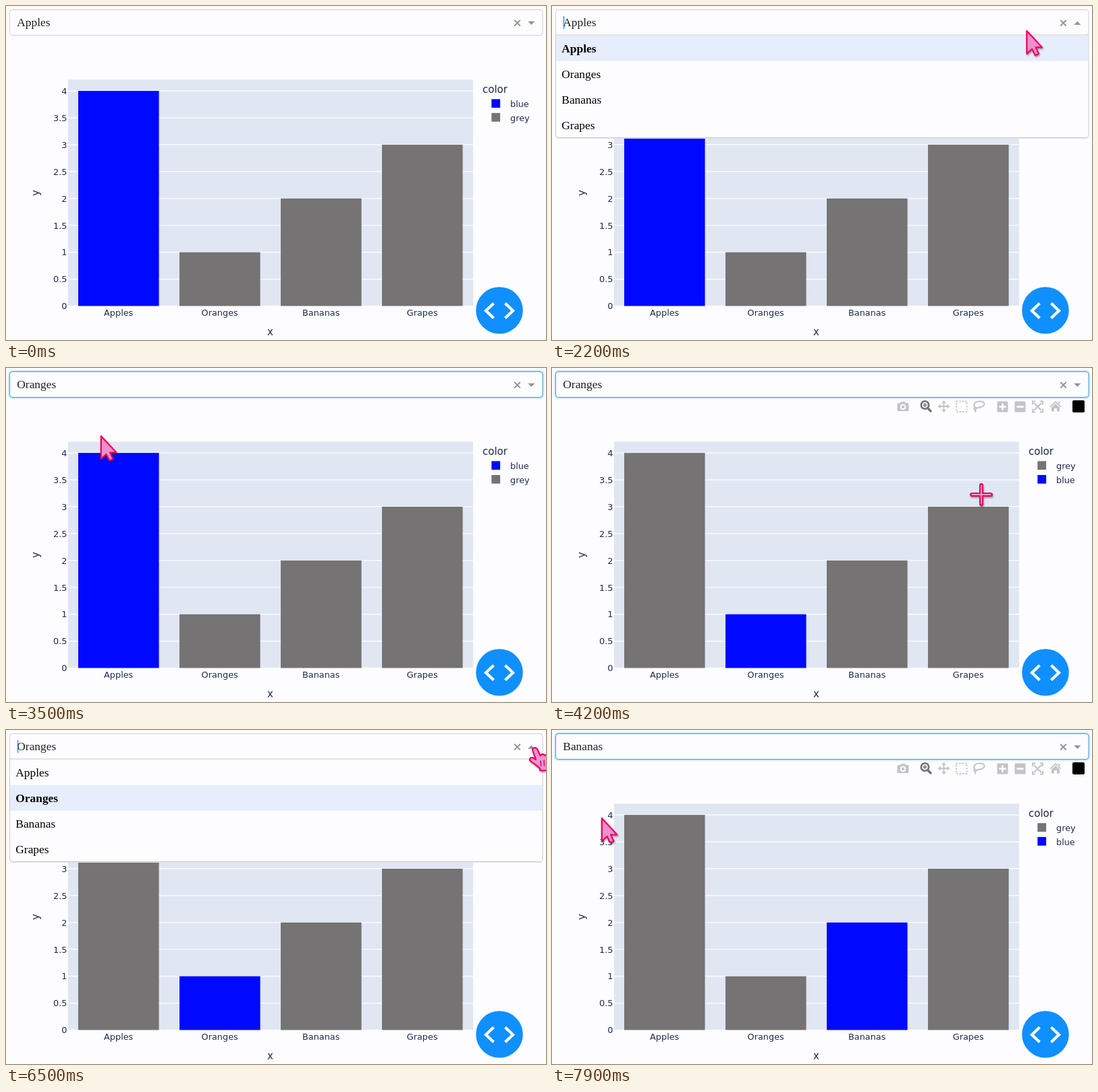
An HTML page that plays this animation: 800 by 496 pixels, repeating every 8 s.

```html
<!DOCTYPE html>
<html lang="en">
<head>
<meta charset="utf-8">
<title>Fruit bar chart</title>
<style>
  html, body { margin: 0; width: 100%; height: 100%; overflow: hidden; background: #fdfcff; }
  svg { display: block; width: 800px; height: 496px; }
  .plot { font: 12.85px "DejaVu Sans", sans-serif; fill: #1e2d4d; }
  .title { font-size: 15px; }
  .mid { text-anchor: middle; }
  .end { text-anchor: end; }
  .field { font: 17.4px "Liberation Serif", serif; fill: #222; }
  .tip { font: 14px "Liberation Sans", sans-serif; fill: #fff; }
  .icon { fill: #c3c3c8; stroke: none; }
  .line { fill: none; stroke: #c3c3c8; stroke-width: 2; }
  #pointer { filter: drop-shadow(1px 2px 1.2px rgba(0, 0, 0, .35)); }
  #pointer path { stroke-linejoin: round; stroke-linecap: round; }
</style>
</head>
<body>
<svg viewBox="0 0 800 496">
  <rect width="800" height="496" fill="#fdfcff"/>
  <g id="chart" class="plot"></g>

  <g id="tools">
    <path class="icon" fill-rule="evenodd" d="M513 52h3l1.500-2h5l1.500 2h3q1.500 0 1.500 1.500v9q0 1.500-1.500 1.500h-14q-1.500 0-1.500-1.500v-9q0-1.500 1.500-1.500zM520 53.500a4.300 4.300 0 1 0 .01 0zM520 55.500a2.300 2.300 0 1 1-.01 0z"/>
    <g fill="none" stroke="#717176">
      <circle cx="552.500" cy="55" r="5.700" stroke-width="2.600"/>
      <path d="M557 60l5 5" stroke-width="3.400"/>
      <path d="M549.500 55h6M552.500 52v6" stroke-width="1.700"/>
    </g>
    <path class="line" d="M573 57h15M580.500 50v15"/>
    <path class="icon" d="M571.500 57l4-3.500v7zM589.500 57l-4-3.500v7zM580.500 48l-3.500 4h7zM580.500 66l-3.500-4h7z"/>
    <rect class="line" x="599" y="49.500" width="15.500" height="15.500" stroke-dasharray="2.200 2.200"/>
    <path class="line" d="M628 59c-5-3-3-9 5-9.500 9-.5 9.500 6.500 3 8.500-3 1-6 1.500-8 1zm0 0c-2-1-4 1-2 2.500 2 1 3-1 2-2.500zM627 61.500q1 2-.5 4"/>
    <path class="icon" fill-rule="evenodd" d="M661 49.500h13q1.500 0 1.500 1.500v13q0 1.500-1.500 1.500h-13q-1.500 0-1.500-1.500v-13q0-1.500 1.500-1.500zM666 52.500v3.500h-3.500v3h3.500v3.500h3v-3.500h3.500v-3h-3.500v-3.500z"/>
    <path class="icon" fill-rule="evenodd" d="M687 49.500h13q1.500 0 1.500 1.500v13q0 1.500-1.500 1.500h-13q-1.500 0-1.500-1.500v-13q0-1.500 1.500-1.500zM688.500 56v3h10v-3z"/>
    <path class="line" d="M712 54v-4.500h4M723 49.500h4v4.500M727 61v4.500h-4M716 65.500h-4v-4.500M714 52l11 11M725 52l-11 11" stroke-width="1.700"/>
    <path class="icon" d="M746 49l8.500 8-1.200 1.200-7.300-6.700-7.300 6.700-1.200-1.200zM746 53l6 5.500v6h-4v-4.500h-4v4.500h-4v-6zM750 50h2.500v4l-2.500-2.300z"/>
    <rect x="771" y="48" width="18" height="18" rx="2" fill="#000"/>
  </g>

  <g id="label">
    <path id="labelBox" stroke="#fff"/>
    <text class="tip"></text><text class="tip"></text><text class="tip"></text>
  </g>

  <circle cx="731" cy="452" r="34.800" fill="#108fff"/>
  <path d="M722.500 441.500l-11.500 11 11.500 11M739.500 441.500l11.500 11-11.500 11" fill="none" stroke="#fff" stroke-width="4.200"/>

  <rect id="glow" x="4.500" y="4.500" width="791.500" height="40" rx="5" fill="none" stroke="#bfe0f2" stroke-width="3" opacity=".7"/>
  <rect id="box" x="5.500" y="5.500" width="789.500" height="38" rx="4" fill="#fdfcff"/>
  <g id="menu">
    <path d="M6 196.500h789" stroke="#e4e3e8"/>
    <path d="M5.500 43V191q0 4.500 4.500 4.500H790.500q4.500 0 4.500-4.500V43z" fill="#fdfcff" stroke="#cbcace"/>
    <rect id="focus" x="6" width="788.500" height="38.200" fill="#e6eefd"/>
    <path d="M6 43.500h789" stroke="#e2e2e8"/>
  </g>
  <text id="value" class="field" x="16.300" y="29.700"></text>
  <path id="caret" d="M17.500 15v19" stroke="#1698c0" stroke-width="1.300"/>
  <path d="M753.300 21l8.500 8.500M761.800 21l-8.500 8.500" stroke="#949397" stroke-width="1.900"/>
  <path id="arrow" fill="#949397"/>

  <g id="pointer">
    <g id="arrowCursor">
      <path d="M0.800 1V35L8.500 28 13.500 37.500 18.500 35 14 25.500H23.500z" fill="#ee8fd0" stroke="#ee0058" stroke-width="2.200"/>
    </g>
    <g id="handCursor">
      <path d="M-2.500 4.500C-4.500 0 2 -2 4 2L8.500 11.500C11 8.500 14 9 15 11.500 17 9.500 20 10 20.500 12.500 23 12 24.500 13.500 24.500 17V25.500Q24 28 22 30V33.500H8V30.500C3 26 0 23.500-5 20.500-9 18-6.500 13-2 15L2 17.500z" fill="#f294d8" stroke="#ee0058" stroke-width="2.200"/>
      <path d="M9 19.500l.8 7.500M14 18.500l.4 8M18.500 18.500v7.500" fill="none" stroke="#ee0058" stroke-width="1.600"/>
    </g>
    <g id="crossCursor" fill="none">
      <path d="M0-14V14M-14 0H14" stroke="#e6005e" stroke-width="6"/>
      <path d="M0-13.500V13.500M-13.500 0H13.500" stroke="#f2a5c6" stroke-width="2"/>
    </g>
  </g>
</svg>
<script>
const LOOP = 8000, STEP = 100, ROW = 38.2, MENU_TOP = 43.5;
const FRUIT = ['Apples', 'Oranges', 'Bananas', 'Grapes'];
const COUNT = [4, 1, 2, 3];
const COLOR = { blue: '#0008ff', grey: '#757374' };
const OPEN = [[2000, 3500], [6400, 7500]];
const PICKS = [3500, 7500];

// time, x, y of the pointer's hot spot
const PATH = [
  [1300, 797.5, 53], [1500, 788, 36], [1800, 779, 26], [2000, 779, 26],
  [2500, 480, 62], [2900, 238, 81.4], [3300, 140, 100], [3500, 140, 100],
  [3800, 330, 150], [4200, 636, 188], [4400, 570, 235], [4800, 320, 400],
  [5100, 350, 428], [5200, 386, 433], [5700, 650, 240], [6200, 780, 30],
  [6500, 783, 26.5], [6800, 783, 26.5], [7200, 300, 112], [7500, 100, 140],
  [7600, 99, 140], [7900, 73, 130]
];

const $ = id => document.getElementById(id);
const set = (el, attrs) => { for (const k in attrs) el.setAttribute(k, attrs[k]); return el; };
const add = (parent, tag, attrs, text = '') => {
  const el = document.createElementNS('http://www.w3.org/2000/svg', tag);
  el.textContent = text;
  return parent.appendChild(set(el, attrs));
};
const show = (el, on) => { el.style.display = on ? '' : 'none'; };
const yOf = v => 445.5 - v * 79.85;
const barX = i => 107 + i * 150;

const chart = $('chart');
add(chart, 'rect', { x: 92, y: 109.5, width: 600, height: 336, fill: '#e0e6f2' });
for (let v = 0; v <= 4; v += 0.5) {
  add(chart, 'path', { d: `M92 ${yOf(v)}h600`, stroke: '#fff', 'stroke-width': 1.2 });
  add(chart, 'text', { x: 90.5, y: yOf(v) + 4.8, class: 'end' }, v);
}
const bars = COUNT.map((n, i) =>
  add(chart, 'rect', { x: barX(i), y: yOf(n), width: 119.6, height: n * 79.85 }));
FRUIT.forEach((name, i) => add(chart, 'text', { x: 166.7 + i * 150, y: 460, class: 'mid' }, name));
add(chart, 'text', { x: 391.5, y: 489, class: 'title mid' }, 'x');
add(chart, 'text', { transform: 'translate(48.5 277.5) rotate(-90)', class: 'title mid' }, 'y');
add(chart, 'text', { x: 706, y: 129, class: 'title' }, 'color');
const legend = [0, 1].map(i => ({
  swatch: add(chart, 'rect', { x: 719.3, y: 138.3 + i * 20.6, width: 12.8, height: 12.8 }),
  name: add(chart, 'text', { x: 747, y: 150 + i * 20.6 })
}));
const options = FRUIT.map((name, i) =>
  add($('menu'), 'text', { x: 14.3, y: 68.5 + i * 38.1, class: 'field' }, name));
const tipLines = [...document.querySelectorAll('.tip')];

function slope(i, axis) {
  const p = PATH[i], a = PATH[i - 1], b = PATH[i + 1];
  if (!a || !b) return 0;
  const before = (p[axis] - a[axis]) / (p[0] - a[0]), after = (b[axis] - p[axis]) / (b[0] - p[0]);
  return before * after <= 0 ? 0 : 2 * before * after / (before + after);
}

// Smooth curve through the path points, at rest where it turns or pauses
function pointerAt(t) {
  if (t < PATH[0][0]) return null;
  let i = 0;
  while (i < PATH.length - 2 && t >= PATH[i + 1][0]) i++;
  const a = PATH[i], b = PATH[i + 1], span = b[0] - a[0];
  const u = Math.min(1, (t - a[0]) / span), w = 1 - u;
  return [1, 2].map(k => a[k] * w * w * (1 + 2 * u) + b[k] * u * u * (3 - 2 * u)
    + span * u * w * (slope(i, k) * w - slope(i + 1, k) * u));
}

const openSpan = t => OPEN.find(([a, b]) => t >= a && t < b);
const pickAt = t => PICKS.filter(p => t >= p).length;
const ramp = (t, from) => Math.max(0, Math.min(1, (t - from) / 300));

function cursorKind([x, y], open) {
  if (open && y > MENU_TOP && y < 195) return 'hand';
  if (y < MENU_TOP) return x > 745 ? 'hand' : 'arrow';
  if (y > 48 && y < 67 && x > 510 && x < 790) return 'hand';
  return x > 92 && x < 692 && y > 109 && y < 445 ? 'cross' : 'arrow';
}

function drawLabel(t) {
  const p = pointerAt(t - STEP);
  const i = !p || openSpan(t) || openSpan(t - STEP) ? -1 : COUNT.findIndex((n, k) =>
    p[0] > barX(k) && p[0] < barX(k) + 120 && p[1] > yOf(n) && p[1] < 445);
  show($('label'), i >= 0);
  if (i < 0) return;
  const x = barX(i) + 120, y = yOf(COUNT[i]), color = i === pickAt(t - STEP) ? 'blue' : 'grey';
  [`color=${color}`, `x=${FRUIT[i]}`, `y=${COUNT[i]}`].forEach((text, k) => {
    tipLines[k].textContent = text;
    set(tipLines[k], { x: x + 9.5, y: y - 13.6 + k * 18.4 });
  });
  const width = Math.max(...tipLines.map(l => l.getComputedTextLength())) + 6.5;
  set($('labelBox'), {
    d: `M${x} ${y}l6.500-6V${y - 29.5}h${width}v59h${-width}V${y + 6}z`,
    fill: COLOR[color]
  });
}

function draw(t) {
  const pick = pickAt(t), charted = pickAt(t - STEP), span = openSpan(t), p = pointerAt(t);

  bars.forEach((bar, i) => set(bar, { fill: i === charted ? COLOR.blue : COLOR.grey }));
  const order = charted ? ['grey', 'blue'] : ['blue', 'grey'];
  legend.forEach(({ swatch, name }, i) => {
    set(swatch, { fill: COLOR[order[i]] });
    name.textContent = order[i];
  });
  $('tools').style.opacity = ramp(t, 3500) - ramp(t, 6200) + ramp(t, 7500);
  drawLabel(t);

  const focused = pick > 0 && !span;
  show($('glow'), focused);
  set($('box'), { stroke: focused ? '#3d9ecb' : '#d0cfd4' });
  $('value').textContent = FRUIT[pick];
  set($('arrow'), { d: span ? 'M773.200 28h10.200l-5.100-5.300z' : 'M773.200 22.800h10.200l-5.100 5.300z' });
  show($('menu'), span);
  show($('caret'), span && (t - span[0]) % 1000 < 500);
  const row = p && p[1] > MENU_TOP ? Math.min(3, Math.floor((p[1] - MENU_TOP) / ROW)) : pick;
  set($('focus'), { y: MENU_TOP + row * 38.1 });
  options.forEach((o, i) => { o.style.fontWeight = i === pick ? 'bold' : 'normal'; o.style.fill = '#000'; });

  show($('pointer'), p);
  if (!p) return;
  set($('pointer'), { transform: `translate(${p[0]} ${p[1]})` });
  const kind = cursorKind(p, span);
  for (const k of ['arrow', 'hand', 'cross']) show($(k + 'Cursor'), k === kind);
}

const start = performance.now();
function tick() {
  const t = (performance.now() - start) % LOOP;
  draw(Math.floor(t / STEP) * STEP);
  requestAnimationFrame(tick);
}
tick();
</script>
</body>
</html>
```
